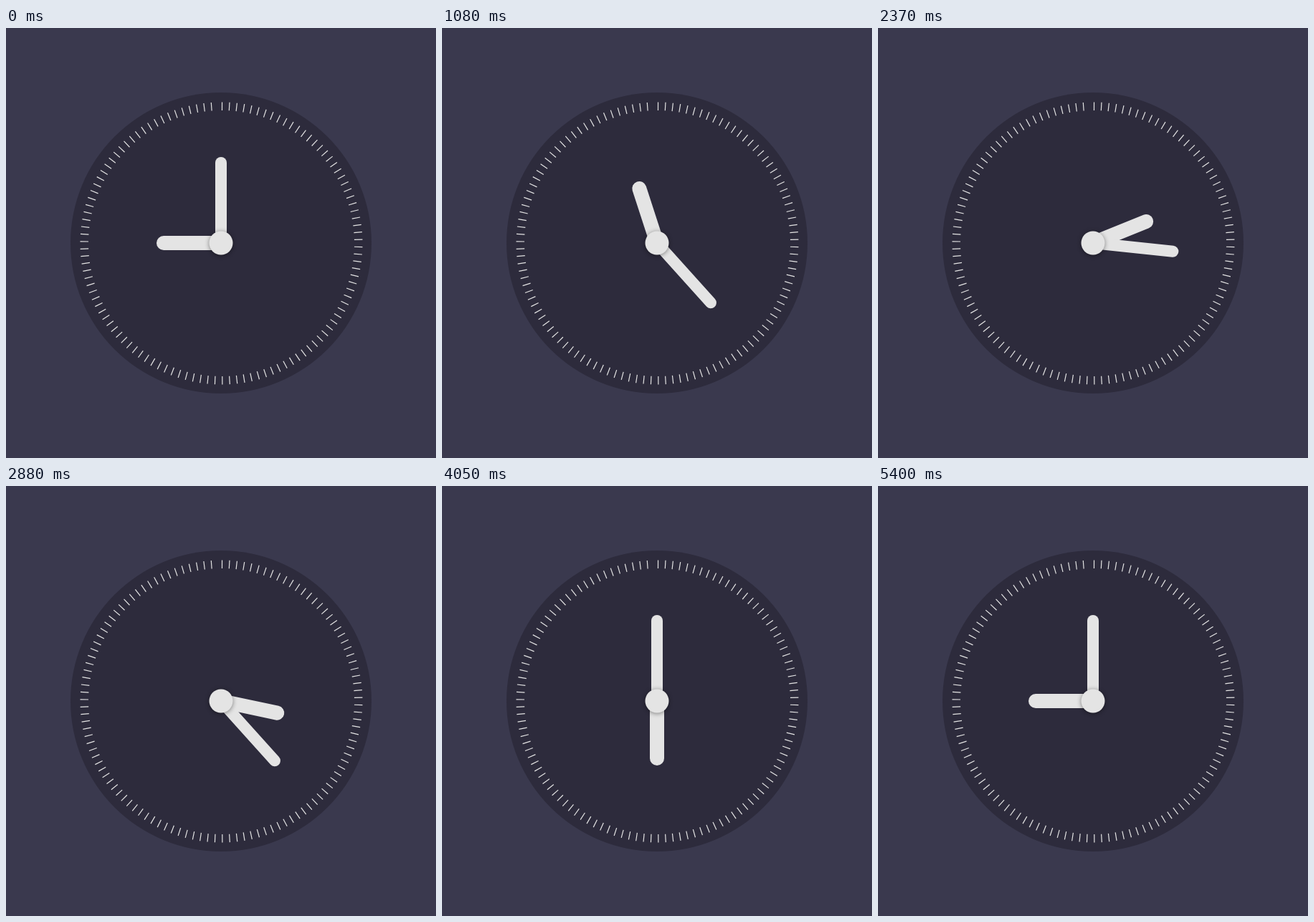
Animation, 600 px wide and 600 px high, one loop 5.43 s. Source, as an HTML page with a canvas:

```html
<!DOCTYPE html>
<html>
<head>
<meta charset="utf-8">
<style>
  html, body { margin: 0; width: 100%; height: 100%; overflow: hidden; background: #3a394e; }
  canvas { display: block; }
</style>
</head>
<body>
<canvas id="stage" width="600" height="600"></canvas>
<script>
const ctx = document.getElementById('stage').getContext('2d');
const LOOP = 5430, STEP = 30, HOUR = 450;
const LIGHT = '#e4e4e4';
const rad = deg => deg * Math.PI / 180;

function disc(r, color) {
  ctx.fillStyle = color;
  ctx.beginPath();
  ctx.arc(300, 300, r, 0, 2 * Math.PI);
  ctx.fill();
}

function ticks() {
  ctx.strokeStyle = LIGHT;
  ctx.lineWidth = 1.2;
  ctx.beginPath();
  for (let i = 0; i < 118; i++) {
    const a = rad(0.3 + 3.039 * i), x = Math.sin(a), y = -Math.cos(a);
    ctx.moveTo(300.5 + 185.5 * x, 300.5 + 185.5 * y);
    ctx.lineTo(300.5 + 197 * x, 300.5 + 197 * y);
  }
  ctx.stroke();
}

function hand(angle, length, width) {
  ctx.save();
  ctx.translate(300, 300);
  ctx.rotate(rad(angle));
  ctx.fillStyle = LIGHT;
  ctx.beginPath();
  ctx.roundRect(-width / 2, -length, width, length, [width / 2, width / 2, 0, 0]);
  ctx.fill();
  ctx.restore();
}

// Each turn of the minute hand has three equal spans of 120, 90 and 150 degrees.
function minuteAngle(turn) {
  const p = turn % 1 * 3;
  if (p < 1) return 120 * p;
  if (p < 2) return 120 + 90 * (p - 1);
  return 210 + 150 * (p - 2);
}

function draw(now) {
  const t = Math.floor(now % LOOP / STEP) * STEP;
  const hours = t / HOUR;
  ctx.fillStyle = '#3a394e';
  ctx.fillRect(0, 0, 600, 600);
  disc(210, '#2d2b3c');
  ticks();
  hand(270 + 30 * hours, 90, 20);
  hand(minuteAngle(hours), 120, 16);
  ctx.save();
  ctx.shadowColor = 'rgba(0,0,0,.45)';
  ctx.shadowBlur = 6;
  ctx.shadowOffsetY = 1;
  disc(16.5, LIGHT);
  ctx.restore();
}

const start = performance.now();
function loop() {
  draw(performance.now() - start);
  requestAnimationFrame(loop);
}
loop();
</script>
</body>
</html>
```
